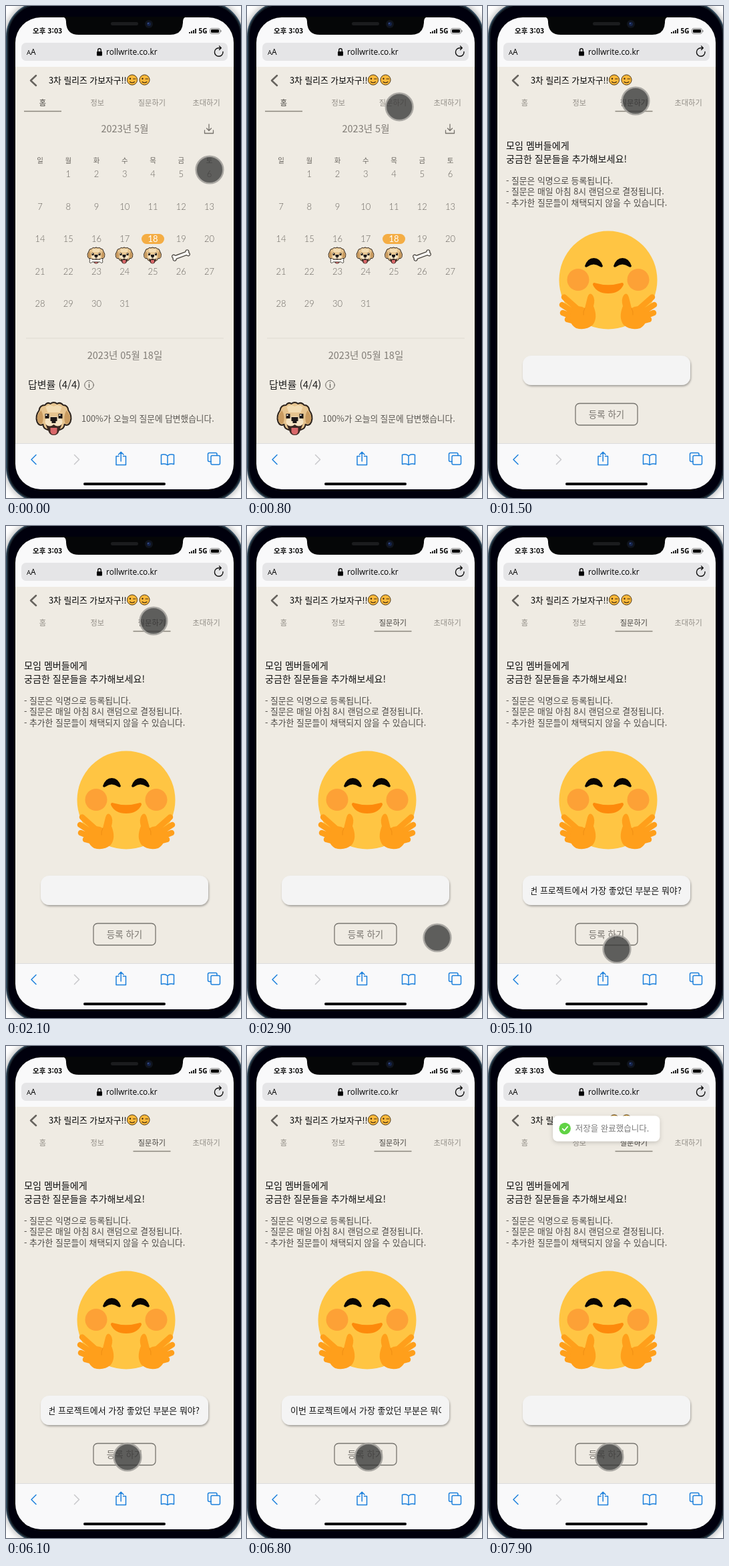
An HTML page for the animation above (8 s loop, 352 by 736 pixels).

```html
<!DOCTYPE html>
<html lang="ko">
<head>
<meta charset="utf-8">
<style>
html, body { margin: 0; width: 100%; height: 100%; overflow: hidden; background: #fff; }
svg { display: block; width: 352px; height: 736px; font-family: "Noto Sans CJK KR", "Noto Sans CJK", "Noto Sans CJK JP", sans-serif; }
.mid { text-anchor: middle; }
.light { font-weight: 300; }
.line { fill: none; stroke-linecap: round; stroke-linejoin: round; }
.tab { font-size: 11.2px; font-weight: 300; fill: #918d86; text-anchor: middle; }
.tab.on { fill: #45423e; }
.latin { font-family: "Open Sans", "Noto Sans", sans-serif; }
#days { font-family: Lato, "Noto Sans CJK KR", "Noto Sans CJK JP", sans-serif; }
</style>
</head>
<body>
<svg viewBox="0 0 352 736">
  <defs>
    <clipPath id="page"><rect x="14" y="91" width="327" height="563"/></clipPath>
    <clipPath id="field"><rect x="65" y="530" width="226" height="32"/></clipPath>
    <filter id="drop" x="-20%" y="-40%" width="140%" height="200%">
      <feDropShadow dx="1" dy="2" stdDeviation="1.5" flood-opacity=".32"/>
    </filter>
    <filter id="soft" x="-20%" y="-40%" width="140%" height="200%">
      <feDropShadow dx="0" dy="2" stdDeviation="3" flood-opacity=".18"/>
    </filter>
    <filter id="halo"><feDropShadow dx="0" dy="0" stdDeviation="6" flood-opacity=".4"/></filter>
    <g id="wink">
      <circle r="7.600" fill="#fdb93b" stroke="#4a3410"/>
      <path class="line" d="M1.500-1.500H5M-3.500 3Q0 5.500 3.500 3" stroke="#3d2a0d" stroke-width="1.200"/>
      <circle cx="-3" cy="-1.800" r="1.200" fill="#3d2a0d"/>
    </g>
    <g id="dog" stroke-linejoin="round" stroke="#2a211b" stroke-width="2">
      <path d="M-13-20Q-10-25-5-22Q0-26 5-22Q10-25 14-20Q21-20 22-12Q28-4 25 5Q22 12 16 9Q16 15 9 17H-9Q-16 15-16 9Q-22 12-25 5Q-28-4-22-12Q-21-20-13-20Z" fill="#e6c48f"/>
      <g stroke="none">
        <path d="M-19-12Q-27-4-24 4Q-21 10-17 7Q-14-4-19-12ZM19-12Q27-4 24 4Q21 10 17 7Q14-4 19-12Z" fill="#c99b60"/>
        <path d="M-12-17Q-6-22 0-18Q6-22 12-17L9-9H-9Z" fill="#f3dcb2"/>
        <ellipse cy="5" rx="13" ry="8" fill="#f6e4c4"/>
        <path d="M-12 9Q-6 14 0 9Q6 14 12 9L8 19Q6 25 0 25Q-6 25-8 19Z" fill="#3a2822"/>
        <path d="M-5 14H5V20Q4 24 0 24Q-4 24-5 20Z" fill="#d9686a"/>
        <path d="M-13-7h6v7h-6zM7-7h6v7h-6zM-5-2h10v6h-2v3h-6v-3h-2z" fill="#1d1817"/>
        <path d="M-12-6h2v2h-2zM8-6h2v2h-2z" fill="#fff"/>
      </g>
    </g>
    <g id="bone">
      <path d="M-8-2.500Q-10-6-12.500-4Q-14-2-12.500 0Q-14 2-12.500 4Q-10 6-8 2.500H8Q10 6 12.500 4Q14 2 12.500 0Q14-2 12.500-4Q10-6 8-2.500Z" fill="#fbf9f5" stroke="#3c3833" stroke-width="1.200"/>
    </g>
    <g id="hand">
      <path class="line" d="M114 435.500L136 455M111 447L134 462M112 459L132 467M119 469L138 474" stroke="#ff9f1b" stroke-width="8.500"/>
      <path d="M128 451Q138 447 145 452L149 436Q152 427 157 433Q161 439 158 449Q165 466 157 477Q146 486 132 482Q120 475 124 460Z" fill="#ff9f1b"/>
      <path class="line" d="M145 452Q142 458 143 462" stroke="#f08f14"/>
    </g>
  </defs>

  <!-- phone body -->
  <rect x="1" y="-5" width="353" height="746" rx="51" fill="#050607" stroke="#33495b" stroke-width="2" filter="url(#halo)"/>
  <rect x="3" y="-2.500" width="349" height="741" rx="48" fill="none" stroke="#17212a" stroke-width="1.500"/>
  <rect x="14" y="17" width="327" height="706" rx="38" fill="#f9f9fa"/>
  <rect x="14" y="91" width="327" height="563" fill="#efebe3"/>
  <path d="M14 654.500H341" stroke="#dcdcdc"/>
  <path d="M84 16Q90 17 90 23V25Q91 43 109 43H246Q264 43 265 25V23Q265 17 271 16Z" fill="#050607"/>
  <rect x="157" y="24" width="41" height="5" rx="2.500" fill="#1b1c1e"/>
  <circle cx="214" cy="27" r="6" fill="#10141d"/>
  <circle cx="214" cy="27" r="3" fill="#15234a"/>
  <circle cx="213" cy="26" r="1" fill="#405b9a"/>

  <!-- status and address bars -->
  <text x="40" y="40.500" font-size="10.500" font-weight="700">오후 3:03</text>
  <path d="M274 39h2v2h-2zM277 37.500h2v3.500h-2zM280 36h2v5h-2zM283 34h2v7h-2z" fill="#222"/>
  <text x="288.500" y="41" class="latin" font-size="10" font-weight="700">5G</text>
  <rect x="305.500" y="33.500" width="15" height="8" rx="2.500" fill="none" stroke="#888"/>
  <rect x="307" y="35" width="12" height="5" rx="1.200"/>
  <path d="M322 36v3" stroke="#888" stroke-width="1.200"/>
  <rect x="23" y="55" width="309" height="27" rx="7" fill="#e5e5e7"/>
  <text x="31" y="73" class="latin" font-size="9.500">A<tspan font-size="12">A</tspan></text>
  <rect x="136" y="68" width="8" height="6.500" rx="1"/>
  <path class="line" d="M137.700 68V66a2.300 2.300 0 0 1 4.600 0V68" stroke="#000" stroke-width="1.300"/>
  <text x="150" y="73" class="latin" font-size="12">rollwrite.co.kr</text>
  <path class="line" d="M325 68.500A6.300 6.300 0 1 1 319 62.700H322M319.500 60L322.300 62.700L319.500 65.500" stroke="#111" stroke-width="1.400"/>

  <!-- page header -->
  <path class="line" d="M45 104L37 111.500L45 119" stroke="#66635e" stroke-width="2.500"/>
  <text x="64" y="115.500" font-size="12.800">3차 릴리즈 가보자구!!</text>
  <use href="#wink" x="189" y="110.500"/>
  <use href="#wink" x="207.500" y="110.500"/>
  <g id="tabs"></g>
  <path id="bar" d="M27 157.500h56" stroke="#8b867d" stroke-width="1.500"/>

  <g id="home">
    <text class="mid" x="178" y="189" font-size="14.500" fill="#807c76">2023년 5월</text>
    <path class="line" d="M297.500 186V190.500H310.500V186M304 177V186M300.500 183L304 186.500L307.500 183" stroke="#77736d" stroke-width="1.300"/>
    <rect x="203" y="341" width="34" height="15" rx="7.500" fill="#f4ad44"/>
    <g id="days" class="mid light" fill="#6b6761"></g>
    <use href="#dog" transform="translate(135 373) scale(.5)"/>
    <use href="#bone" transform="translate(135 381) scale(.75)"/>
    <use href="#dog" transform="translate(177 373) scale(.5)"/>
    <use href="#dog" transform="translate(219.500 373) scale(.5)"/>
    <use href="#bone" transform="translate(262 373) rotate(-20)"/>
    <path d="M30 497H326" stroke="#dfdbd2"/>
    <text class="mid" x="178" y="528" font-size="14.500" fill="#807c76">2023년 05월 18일</text>
    <text x="33" y="572" font-size="15" fill="#222">답변률 (4/4)</text>
    <g class="line" stroke="#66635e">
      <circle cx="124.500" cy="567" r="6.800"/>
      <path d="M124.500 566V570.500M124.500 563.200V563.500" stroke-width="1.400"/>
    </g>
    <use href="#dog" x="71.500" y="617"/>
    <text class="light" x="113" y="621.500" font-size="12.700" fill="#5a5752">100%가 오늘의 질문에 답변했습니다.</text>
  </g>

  <g id="ask">
    <g font-size="14.100" fill="#111">
      <text x="27" y="213.500">모임 멤버들에게</text>
      <text x="27" y="233.500">궁금한 질문들을 추가해보세요!</text>
    </g>
    <g class="light" font-size="12.800" fill="#4c4945">
      <text x="27" y="265.500">- 질문은 익명으로 등록됩니다.</text>
      <text x="27" y="282">- 질문은 매일 아침 8시 랜덤으로 결정됩니다.</text>
      <text x="27" y="298.500">- 추가한 질문들이 채택되지 않을 수 있습니다.</text>
    </g>
    <circle cx="180" cy="410" r="73.500" fill="#ffc543"/>
    <g fill="#fda136"><circle cx="135" cy="409.500" r="16.500"/><circle cx="225" cy="409.500" r="16.500"/></g>
    <path d="M145 389Q149 377 158.500 377Q168 377 172 389Q171 392 168 390Q158 383 149 390Q146 392 145 389ZM188 389Q192 377 201.500 377Q211 377 215 389Q214 392 211 390Q201 383 192 390Q189 392 188 389Z" fill="#090604"/>
    <path d="M157 417Q157 413 161 414.500Q180 420 199 414.500Q203 413 203 417Q197 430 180 430Q163 430 157 417Z" fill="#fd8a0c"/>
    <use href="#hand"/>
    <use href="#hand" transform="matrix(-1 0 0 1 360 0)"/>
    <rect x="52" y="523" width="251" height="44" rx="13" fill="#f4f4f4" filter="url(#drop)"/>
    <g clip-path="url(#field)"><text id="typed" y="550" font-size="13" fill="#111">이번 프로젝트에서 가장 좋았던 부분은 뭐야?</text></g>
    <rect x="131" y="594.500" width="93" height="32.500" rx="6" fill="none" stroke="#77756f" stroke-width="1.300"/>
    <text class="mid" x="177.500" y="615.500" font-size="13.500" fill="#77736d">등록 하기</text>
  </g>

  <g clip-path="url(#page)">
    <g id="toast">
      <rect x="-80" y="-19" width="160" height="38" rx="7" fill="#fff" filter="url(#soft)"/>
      <g id="check">
        <circle r="8.700" fill="#61d345"/>
        <path id="tick" class="line" d="M-3.500 .3L-.8 3L4-2.800" stroke="#fff" stroke-width="1.800" stroke-dasharray="12"/>
      </g>
      <text class="light" x="-46.500" y="4.500" font-size="12.500" fill="#7a7a7a">저장을 완료했습니다.</text>
    </g>
  </g>

  <!-- browser toolbar -->
  <g class="line" stroke="#1c80dc" stroke-width="1.500">
    <path d="M45 671.500L38 678.500L45 685.500"/>
    <path d="M102.500 671.500L109.500 678.500L102.500 685.500" stroke="#c9c9cb"/>
    <path d="M169 673.500H165V686.500H179.500V673.500H175.500M172.200 681V667.500M168.500 671L172.200 667.300L176 671"/>
    <path d="M242 673Q238 669.500 232.500 671.500V685.500Q238 683.500 242 686.500Q246 683.500 251.500 685.500V671.500Q246 669.500 242 673V686.500"/>
    <rect x="307" y="672.500" width="13.500" height="13.500" rx="2"/>
    <path d="M307 681.500H304.500Q302.500 681.500 302.500 679.500V670.500Q302.500 668.500 304.500 668.500H314Q316 668.500 316 670.500V672.500"/>
  </g>
  <rect x="116" y="713" width="123" height="4" rx="2"/>

  <g id="cursor">
    <circle r="19.800" fill="#383838" fill-opacity=".79"/>
    <circle r="20.300" fill="none" stroke="#a5a29e" stroke-opacity=".9" stroke-width="2.600"/>
  </g>
</svg>
<script>
const LOOP = 8000, OPEN = 1000, PASTE = 3500, BLUR = 6300, TOAST = 7080, CLEAR = 7300;
// time, x, y of the touch point
const PATH = [[0, 305, 245], [350, 305, 245], [900, 221, 142], [2150, 221, 142], [2800, 285, 616],
  [3000, 285, 616], [3400, 235, 574], [4300, 235, 574], [5000, 193, 633], [5150, 193, 633],
  [5400, 184, 621], [5700, 182, 615], [LOOP, 182, 615]];

const get = id => document.getElementById(id);
const put = (id, name, value) => get(id).setAttribute(name, value);
const show = (id, on) => put(id, 'display', on ? 'inline' : 'none');
const part = (t, start, length) => Math.min(1, Math.max(0, (t - start) / length));
const smooth = k => k * k * (3 - 2 * k);
const easeOut = k => 1 - (1 - k) ** 3;

function label(parent, text, x, y, attrs) {
  const el = document.createElementNS('http://www.w3.org/2000/svg', 'text');
  el.textContent = text;
  for (const [key, value] of Object.entries({ x, y, ...attrs })) el.setAttribute(key, value);
  get(parent).append(el);
  return el;
}

const tabs = ['홈', '정보', '질문하기', '초대하기']
  .map((name, i) => label('tabs', name, 55 + i * 81.7, 148.5, { class: 'tab' }));

const column = i => 51 + i * 42.25;
[...'일월화수목금토'].forEach((day, i) => label('days', day, column(i), 235, { 'font-size': 10.5 }));
for (let d = 1; d <= 31; d++) {
  const y = 256 + Math.floor(d / 7) * 48.5;
  label('days', d, column(d % 7), y, { 'font-size': 13, ...(d === 18 && { fill: '#fff', 'font-weight': 400 }) });
}

function moveCursor(t) {
  const i = PATH.findIndex((p, n) => n && t <= p[0]);
  const [t0, x0, y0] = PATH[i - 1], [t1, x1, y1] = PATH[i];
  const k = smooth(part(t, t0, t1 - t0));
  put('cursor', 'transform', `translate(${x0 + (x1 - x0) * k} ${y0 + (y1 - y0) * k})`);
}

function moveToast(t) {
  show('toast', t >= TOAST);
  const k = easeOut(part(t, TOAST, 300));
  put('toast', 'transform', `translate(177.2 ${123.5 - 76 * (1 - k)}) scale(${0.6 + 0.4 * k})`);
  put('toast', 'opacity', 0.5 + 0.5 * k);
  put('check', 'transform', `translate(-62 0) scale(${easeOut(part(t, TOAST + 100, 250))})`);
  put('tick', 'stroke-dashoffset', 12 * (1 - part(t, TOAST + 250, 200)));
}

function draw(t) {
  const asking = t >= OPEN;
  show('home', !asking);
  show('ask', asking);
  tabs.forEach((tab, i) => tab.classList.toggle('on', i === (asking ? 2 : 0)));
  put('bar', 'd', `M${asking ? 190.5 : 27} 157.500h56`);

  // The focused field is scrolled to the end of its text.
  show('typed', t >= PASTE && t < CLEAR);
  put('typed', 'x', t < BLUR ? 290 : 65);
  put('typed', 'text-anchor', t < BLUR ? 'end' : 'start');

  moveToast(t);
  moveCursor(t);
}

const began = performance.now();
function frame() {
  draw((performance.now() - began) % LOOP);
  requestAnimationFrame(frame);
}
frame();
</script>
</body>
</html>
```
